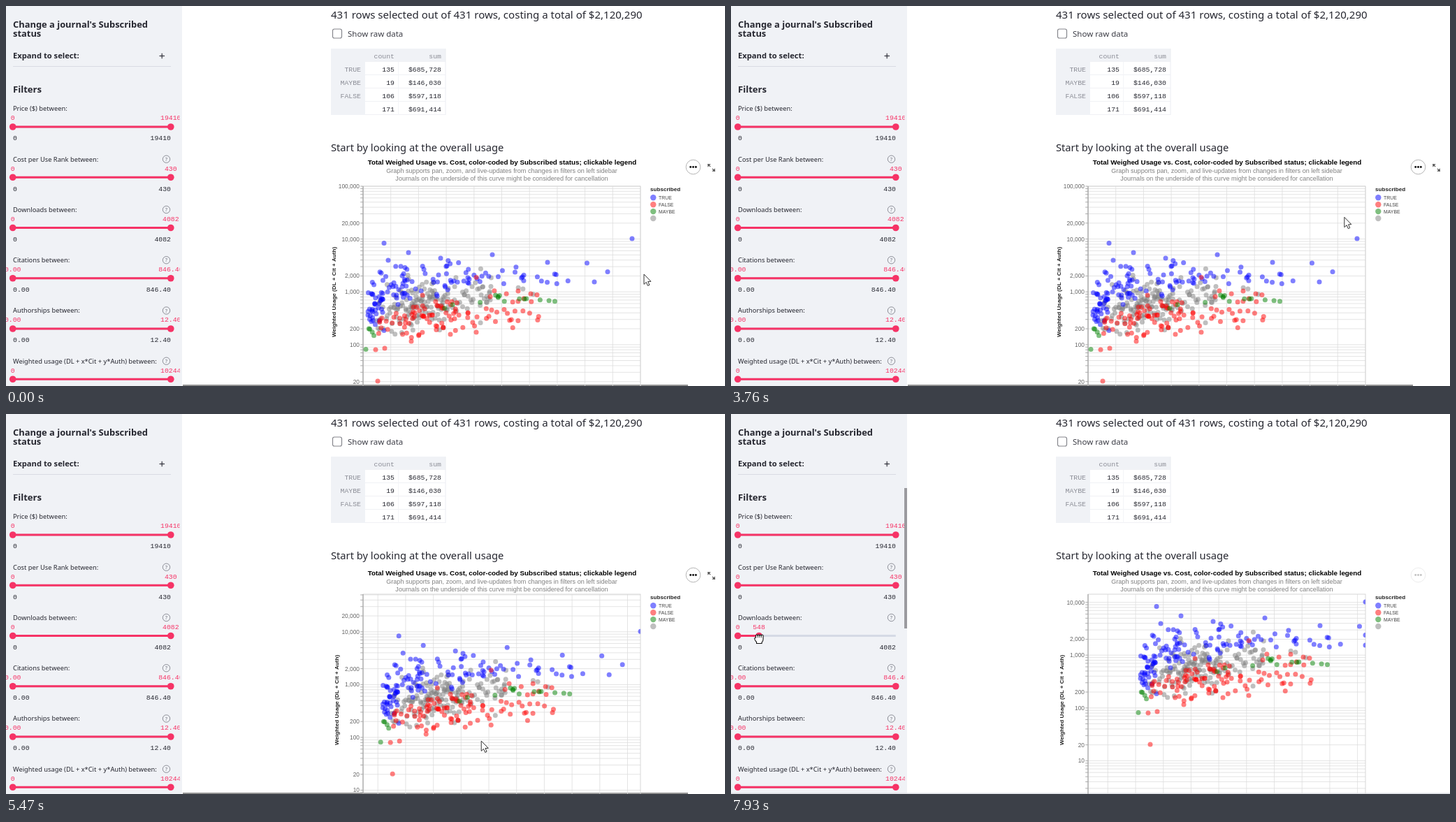
Write an HTML page with a canvas that moves like this. It is 1029 by 544 pixels and loops after 8 s.

```html
<!DOCTYPE html>
<html lang="en">
<head>
<meta charset="utf-8">
<title>Journal usage dashboard</title>
<style>
html, body { margin: 0; width: 100%; height: 100%; overflow: hidden; background: #fff; }
canvas { display: block; width: 1029px; height: 544px; }
</style>
</head>
<body>
<canvas id="stage"></canvas>
<script>
const W = 1029, H = 544, LOOP = 8000;
const canvas = document.getElementById('stage');
const dpr = window.devicePixelRatio || 1;
canvas.width = W * dpr;
canvas.height = H * dpr;
const c = canvas.getContext('2d');

const SANS = '"Noto Sans", sans-serif';
const MONO = '"Liberation Mono", monospace';
const ARIAL = '"Liberation Sans", Arial, sans-serif';
const PINK = '#f63366', INK = '#262730', PANEL = '#f0f2f6', MUTED = '#8b8d96';
const PLOT = { x: 511, y: 258, right: 908, bottom: 561, decade: 75.6, step: 39.7 };
const KINDS = {
  TRUE: { color: 'blue', dim: '#b6b6de' },
  FALSE: { color: 'red', dim: '#e0b8b8' },
  MAYBE: { color: 'green', dim: '#b4cdb6' },
  '': { color: 'gray', dim: '#d8d8d8' }
};

// Drawing helpers. Text is placed by the middle of its capitals.
function text(s, x, y, size, font, color, align = 'left', weight = '') {
  c.font = `${weight} ${size}px ${font}`;
  c.fillStyle = color;
  c.textAlign = align;
  c.fillText(s, x, y + size * 0.35);
}
function rect(x, y, w, h, color) {
  c.fillStyle = color;
  c.fillRect(x, y, w, h);
}
function disc(x, y, r, color) {
  c.fillStyle = color;
  c.beginPath();
  c.arc(x, y, r, 0, Math.PI * 2);
  c.fill();
}
function ring(x, y, r, color) {
  c.strokeStyle = color;
  c.lineWidth = 1;
  c.beginPath();
  c.arc(x, y, r, 0, Math.PI * 2);
  c.stroke();
}
function line(x1, y1, x2, y2, color, width = 1) {
  c.strokeStyle = color;
  c.lineWidth = width;
  c.beginPath();
  c.moveTo(x1, y1);
  c.lineTo(x2, y2);
  c.stroke();
}
function outline(color, width) {
  c.closePath();
  c.fillStyle = '#fff';
  c.fill();
  c.strokeStyle = color;
  c.lineWidth = width;
  c.stroke();
}
function clipTo(x, y, w, h) {
  c.beginPath();
  c.rect(x, y, w, h);
  c.clip();
}
const clamp = (v, lo, hi) => Math.max(lo, Math.min(hi, v));

// Eased values at time t from rows of [time, ...values].
function track(keys, t) {
  const i = keys.findIndex(k => k[0] > t);
  if (i < 0) return keys[keys.length - 1].slice(1);
  if (i === 0) return keys[0].slice(1);
  const a = keys[i - 1], b = keys[i];
  const p = (t - a[0]) / (b[0] - a[0]);
  const e = p * p * (3 - 2 * p);
  return a.slice(1).map((v, n) => v + (b[n + 1] - v) * e);
}

const POINTER = [
  [60, 913, 384], [400, 896, 334], [900, 832, 367], [1460, 832, 367],
  [1940, 936, 274], [2810, 936, 290], [3610, 936, 296], [4080, 697, 322],
  [4800, 697, 322], [5150, 659, 488], [5300, 659, 488], [5760, 727, 424],
  [6160, 727, 424], [6930, 236, 318], [7080, 236, 318], [7930, 40.05, 318]
];
const ZOOM = [[4000, 1], [4230, 0.638], [4480, 0.638], [4950, 1]];
const PAN = [[5300, 0, 0], [5760, 68, -70], [6080, 68, -64]];

function selection(t) {
  if (t < 2160 || t >= 3610) return null;
  return t < 2810 ? 'TRUE' : t < 3120 ? 'FALSE' : 'MAYBE';
}

// Scatter data: seeded clouds plus a few outliers.
let seed = 77;
function rand() {
  seed = (seed * 1664525 + 1013904223) % 4294967296;
  return seed / 4294967296;
}
const bell = () => (rand() + rand() + rand()) / 1.5 - 1;
const points = [];
function add(kind, x, y) {
  points.push({ kind, x, y });
}
function cloud(kind, n, x0, x1, y0, y1, spread) {
  for (let i = 0; i < n; i++) {
    const p = rand();
    add(kind, x0 + (x1 - x0) * p, y0 + (y1 - y0) * p + bell() * spread);
  }
}
cloud('', 116, 530, 628, 438, 420, 52);
cloud('', 52, 590, 695, 422, 412, 42);
cloud('', 3, 715, 756, 394, 414, 4);
cloud('TRUE', 38, 518, 541, 432, 418, 54);
cloud('TRUE', 20, 535, 575, 406, 398, 38);
cloud('TRUE', 42, 556, 664, 395, 386, 38);
cloud('TRUE', 25, 660, 812, 393, 386, 22);
cloud('FALSE', 18, 532, 582, 460, 452, 30);
cloud('FALSE', 50, 575, 646, 446, 440, 44);
cloud('FALSE', 34, 646, 770, 438, 430, 44);
cloud('MAYBE', 4, 518, 528, 463, 470, 4);
cloud('MAYBE', 3, 552, 680, 441, 424, 6);
cloud('MAYBE', 11, 695, 786, 414, 423, 12);
[[541, 339.5], [576, 353], [547, 364], [622, 361], [696, 356], [775, 367],
 [831.5, 368], [861, 380.5], [842, 395], [896, 333]].forEach(p => add('TRUE', ...p));
[[673, 388.5], [751, 412], [673, 467], [580, 480], [542, 490], [529, 492], [532, 537]]
  .forEach(p => add('FALSE', ...p));
add('MAYBE', 515, 491.5);

const SLIDERS = [
  ['Price ($) between:', '0', '19410'],
  ['Cost per Use Rank between:', '0', '430'],
  ['Downloads between:', '0', '4082'],
  ['Citations between:', '0.00', '846.40'],
  ['Authorships between:', '0.00', '12.40'],
  ['Weighted usage (DL + x*Cit + y*Auth) between:', '0', '10244']
];
const SLIDE = { x0: 9.7, x1: 235.8 };

function drawSlider([label, low, high], i, right) {
  const y = 173 + i * 72.25, { x0, x1 } = SLIDE;
  const shown = right < x1 ? String(Math.round(4082 * (right - x0) / (x1 - x0))) : high;
  text(label, 10, y - 26, 9.3, SANS, INK);
  if (i > 0) {
    ring(229.5, y - 26, 5.2, MUTED);
    text('?', 229.5, y - 26, 7.5, SANS, '#70727d', 'center');
  }
  c.save();
  clipTo(0, 0, 248.5, H);
  text(low, x0, y - 13, 9.8, MONO, PINK, 'center');
  text(shown, right, y - 13, 9.8, MONO, PINK, 'center');
  c.restore();
  rect(x0, y - 1.5, x1 - x0, 3, '#d5dae5');
  rect(x0, y - 1.5, right - x0, 3, PINK);
  disc(x0, y, 4.8, PINK);
  disc(right, y, 4.8, PINK);
  text(low, 10, y + 16, 9.8, MONO, INK);
  text(high, 236, y + 16, 9.8, MONO, INK, 'right');
}

function drawSidebar(px, t) {
  rect(0, 0, 252, H, PANEL);
  text("Change a journal's Subscribed", 10, 26.5, 12.9, SANS, INK, 'left', 'bold');
  text('status', 10, 39.5, 12.9, SANS, INK, 'left', 'bold');
  text('Expand to select:', 10, 71.5, 11.2, SANS, INK, 'left', 'bold');
  line(219.5, 71.5, 227, 71.5, INK, 1.1);
  line(223.2, 67.8, 223.2, 75.2, INK, 1.1);
  line(10, 86.5, 236, 86.5, '#d9dbe3');
  text('Filters', 10, 119.5, 13.1, SANS, INK, 'left', 'bold');
  const dragged = t >= 7080 ? Math.min(px, SLIDE.x1) : SLIDE.x1;
  SLIDERS.forEach((s, i) => drawSlider(s, i, i === 2 ? dragged : SLIDE.x1));
  if (px < 252) {
    rect(248, 106, 4, 201, '#9b9b9f');
    rect(0, 542.5, W, 1.5, '#dcdde2');
  } else {
    rect(253, 542, 723, 2, '#929292');
  }
}

function drawSummary() {
  text('431 rows selected out of 431 rows, costing a total of $2,120,290', 465, 13, 15.04, SANS, INK);
  c.beginPath();
  c.roundRect(467.5, 33, 13, 13, 2.5);
  outline('#85868c', 1.2);
  text('Show raw data', 489, 39.5, 11.5, SANS, '#3c3d46');

  rect(465, 61, 164, 19, PANEL);
  rect(465, 61, 49, 95, PANEL);
  for (let i = 1; i <= 5; i++) line(514, 60.5 + i * 19, 629, 60.5 + i * 19, '#f0f1f5');
  line(561.5, 80, 561.5, 156, '#f3f4f7');
  line(629, 61, 629, 156, '#ebedf2');
  [['', 'count', 'sum'], ['TRUE', '135', '$685,728'], ['MAYBE', '19', '$146,030'],
   ['FALSE', '106', '$597,118'], ['', '171', '$691,414']].forEach(([name, count, sum], i) => {
    const y = 71.6 + i * 18.9, color = i ? INK : MUTED;
    text(name, 508, y, 9.8, MONO, MUTED, 'right');
    text(count, 556, y, 9.8, MONO, color, 'right');
    text(sum, 623, y, 9.8, MONO, color, 'right');
  });
  text('Start by looking at the overall usage', 465, 203, 14.7, SANS, INK);
}

function drawAxes(toX, toY, k) {
  let widest = 0, top = H;
  for (let n = -20; n < 40; n++) {
    const x = toX(PLOT.x + n * PLOT.step);
    if (x >= PLOT.x && x <= PLOT.right + 0.5) line(x, PLOT.y, x, H, '#dedede', 0.8);
  }
  for (let e = -3; e <= 8; e++) {
    for (let m = 1; m <= 9; m++) {
      const y = toY(PLOT.y + (5 - e - Math.log10(m)) * PLOT.decade);
      if (y < PLOT.y - 0.5 || y > H + 4) continue;
      line(PLOT.x, y, PLOT.right, y, '#dedede', 0.8);
      line(PLOT.x - 3.8, y, PLOT.x, y, '#999', 0.8);
      if (m === 1 || (m === 2 && k > 0.8)) {
        const label = (m * 10 ** e).toLocaleString('en-US');
        text(label, 506, y, 8.35, ARIAL, '#666', 'right');
        widest = Math.max(widest, c.measureText(label).width);
        top = Math.min(top, y);
      }
    }
  }
  c.strokeStyle = '#d2d2d2';
  c.lineWidth = 0.9;
  c.strokeRect(PLOT.x, PLOT.y, PLOT.right - PLOT.x, PLOT.bottom - PLOT.y);
  line(PLOT.x, PLOT.y, PLOT.x, H, '#8f8f8f', 0.9);

  c.save();
  c.translate(499 - widest, 409.5);
  c.rotate(-Math.PI / 2);
  text('Weighted Usage (DL + Cit + Auth)', 0, 0, 8.12, ARIAL, '#222', 'center', 'bold');
  c.restore();

  // The heading sinks when no label sticks out above the plot.
  const drop = clamp(top - PLOT.y, 0, 4);
  text('Total Weighed Usage vs. Cost, color-coded by Subscribed status; clickable legend',
    710, 224 + drop, 9.82, ARIAL, '#000', 'center', 'bold');
  text('Graph supports pan, zoom, and live-updates from changes in filters on left sidebar',
    709.5, 236 + drop, 9.1, ARIAL, '#808080', 'center');
  text('Journals on the underside of this curve might be considered for cancellation',
    709.5, 246.5 + drop, 9.1, ARIAL, '#808080', 'center');
}

function drawLegend(picked) {
  text('subscribed', 922, 262, 8.1, ARIAL, '#222', 'left', 'bold');
  Object.keys(KINDS).forEach((kind, i) => {
    const y = 274.3 + i * 9.9, on = !picked || picked === kind;
    c.globalAlpha = on ? 0.5 : 1;
    disc(926.3, y, 4.2, on ? KINDS[kind].color : KINDS[kind].dim);
    c.globalAlpha = 1;
    text(kind, 934, y, 6.9, ARIAL, on ? '#444' : '#c8c8c8');
  });
}

function drawTools(faded) {
  c.globalAlpha = faded ? 0.25 : 1;
  ring(983.5, 230.5, 10.3, '#b5b5b5');
  for (let i = -1; i <= 1; i++) disc(983.5 + i * 3.8, 230.5, 1.45, '#111');
  c.globalAlpha = 1;
  if (faded) return;
  for (const s of [-1, 1]) {
    const x = 1009.5 + s * 5.2, y = 231.5 + s * 5.2;
    line(1009.5 + s * 1.3, 231.5 + s * 1.3, x, y, '#555', 1.2);
    c.fillStyle = '#555';
    c.beginPath();
    c.moveTo(x, y);
    c.lineTo(x - s * 4.4, y);
    c.lineTo(x, y - s * 4.4);
    c.fill();
  }
}

function drawChart(t, px) {
  const [k] = track(ZOOM, t), [dx, dy] = track(PAN, t);
  const toX = x => 697 + (x - 697) * k + dx;
  const toY = y => 322 + (y - 322) * k + dy;
  const picked = selection(t);
  drawAxes(toX, toY, k);
  c.save();
  clipTo(PLOT.x, PLOT.y, PLOT.right - PLOT.x, H);
  c.globalAlpha = 0.5;
  // Points beyond the domain stay pinned to the plot edge.
  const dot = p => disc(
    clamp(toX(p.x), PLOT.x, PLOT.right), clamp(toY(p.y), PLOT.y, PLOT.bottom), 3.5,
    !picked || picked === p.kind ? KINDS[p.kind].color : 'lightgray');
  points.filter(p => p.kind !== picked).forEach(dot);
  points.filter(p => p.kind === picked).forEach(dot);
  c.restore();
  drawLegend(picked);
  drawTools(px < 460);
}

function drawTooltip(x, y, title, fields) {
  c.save();
  c.shadowColor = 'rgba(0,0,0,0.14)';
  c.shadowBlur = 5;
  c.shadowOffsetY = 1.5;
  rect(x, y, 109, 152, '#fff');
  c.restore();
  c.strokeStyle = '#d8d8d8';
  c.lineWidth = 0.8;
  c.strokeRect(x, y, 109, 152);
  text(title, x + 6, y + 16, 9.8, ARIAL, '#333');
  Object.entries(fields).forEach(([name, value], i) => {
    const row = y + 38.5 + i * 16.5;
    text(name + ':', x + 73, row, 8.25, ARIAL, '#808080', 'right');
    text(value, x + 78, row, 8.25, ARIAL, '#111');
  });
}

function drawArrow(x, y) {
  c.beginPath();
  [[0, 0], [0, 14.4], [3.3, 11.4], [5.5, 16.4], [7.9, 15.3], [5.7, 10.5], [10, 10.3]]
    .forEach(([a, b]) => c.lineTo(x + a, y + b));
  outline('#333', 1);
}

function drawFist(x, y) {
  c.beginPath();
  c.moveTo(x - 3.5, y + 8.5);
  c.lineTo(x - 3.5, y + 6.5);
  c.quadraticCurveTo(x - 7, y + 3, x - 6, y + 0.5);
  c.lineTo(x - 4.5, y);
  for (let i = 0; i < 4; i++) c.arc(x - 3 + i * 2.5, y - 2.5, 1.5, Math.PI, 0);
  c.lineTo(x + 6, y + 2.5);
  c.quadraticCurveTo(x + 6, y + 5, x + 4, y + 7);
  c.lineTo(x + 4, y + 8.5);
  outline('#111', 1.1);
  for (let i = 0; i < 3; i++) line(x - 1.7 + i * 2.5, y - 2, x - 1.7 + i * 2.5, y + 0.3, '#111', 0.8);
}

function draw(t) {
  const [px, py] = track(POINTER, t);
  c.setTransform(dpr, 0, 0, dpr, 0, 0);
  rect(0, 0, W, H, '#fff');
  drawSidebar(px, t);
  drawSummary();
  drawChart(t, px);
  if (t >= 910 && t < 1460) {
    drawTooltip(839, 374, 'Reach Clinic', {
      downloads: 2103, citations: 96.2, authorships: 4, usage: 3464,
      subscription_cost: 16144, cpu_rank: 141, subscribed: 'TRUE'
    });
  }
  if (t >= 6930) drawFist(px, py + 2);
  else drawArrow(px, py);
}

const start = performance.now();
function tick() {
  draw((performance.now() - start) % LOOP);
  requestAnimationFrame(tick);
}
tick();
</script>
</body>
</html>
```
